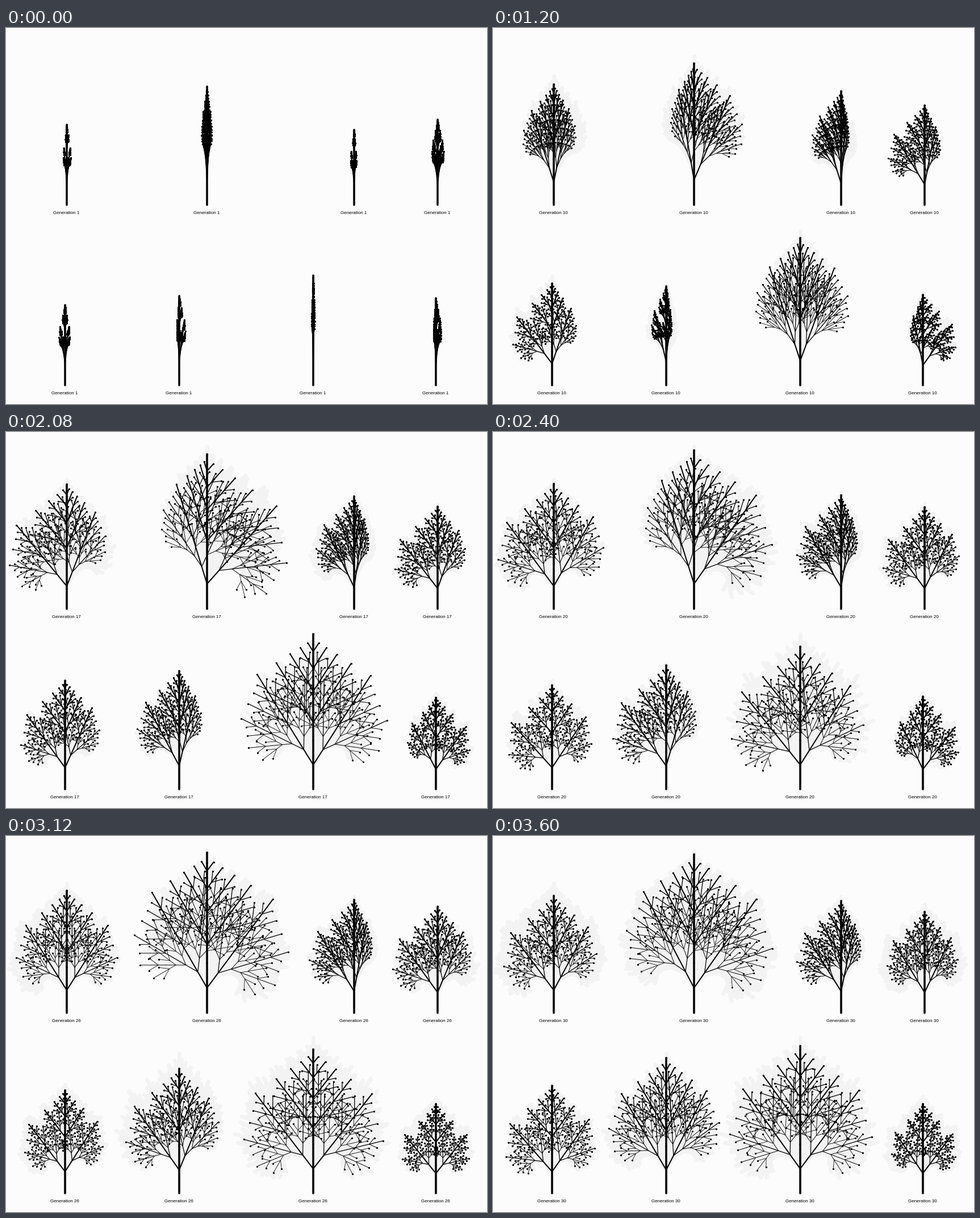
A matplotlib script that plays this animation: 847 by 661 pixels, repeating every 4.08 s.

```python
import numpy as np
import matplotlib.pyplot as plt
from matplotlib.animation import FuncAnimation
from matplotlib.collections import LineCollection
from matplotlib.colors import ListedColormap

W, H, DPI = 847, 661, 100
PX = 72 / DPI
STEP_MS, FRAMES = 80, 51
GEN_MS, LAST_GEN = 120, 30
LEVELS = 6
START_ANGLE = 5
PAPER, SHADOW, INK = "#fcfcfc", "#f3f3f3", "#000000"

RATIOS = np.linspace(0.1, 1.2, 1200)
SUMS = sum(RATIOS**k for k in range(LEVELS))


def ramp(start, end, span):
    """Smooth rise over the given number of generations."""
    t = np.clip(np.arange(LAST_GEN) / span, 0, 1)
    return start + (end - start) * t * t * (3 - 2 * t)


def plant(x, y, stem, height, left, right):
    """height is (start, end, span); left and right are (final angle, span)."""
    rng = np.random.default_rng(x)
    tall = ramp(*height) * rng.normal(1, 0.03, LAST_GEN)
    angles = [ramp(START_ANGLE, *side) + rng.normal(0, 2.5, LAST_GEN)
              for side in (left, right)]
    genes = np.column_stack([tall, *np.maximum(angles, 1)])
    return x, y, stem, genes


PLANTS = [
    plant(107, 311, 40, (139, 216, 6), left=(35, 20), right=(30, 20)),
    plant(354, 311, 44, (220, 280, 12), left=(32, 36), right=(36, 16)),
    plant(613, 311, 38, (129, 200, 10), left=(30, 16), right=(14, 40)),
    plant(760, 311, 36, (149, 180, 16), left=(35, 10), right=(27, 24)),
    plant(104, 628, 38, (139, 181, 7), left=(36, 8), right=(35, 26)),
    plant(305, 628, 41, (149, 232, 24), left=(33, 20), right=(33, 40)),
    plant(541, 628, 43, (207, 256, 6), left=(37, 20), right=(35, 20)),
    plant(757, 628, 35, (151, 164, 20), left=(36, 26), right=(35, 10)),
]


def grow(x, y, stem, height, left, right):
    """Each axis forks at its middle and carries a smaller copy at its tip."""
    ratio = np.interp(height / (2 * stem), SUMS, RATIOS)
    left, right = np.radians([left, right])
    pos = np.array([[x, y]], float)
    ang, order = np.zeros(1), np.zeros(1, int)
    length = stem
    segs, orders = [], []
    for _ in range(LEVELS):
        step = length * np.column_stack([np.sin(ang), -np.cos(ang)])
        fork, tip = pos + step, pos + 2 * step
        segs.append(np.stack([pos, tip], axis=1))
        orders.append(order)
        pos = np.concatenate([fork, fork, tip])
        ang = np.concatenate([ang - left, ang + right, ang])
        order = np.concatenate([order + 1, order + 1, order])
        length *= ratio
    return np.concatenate(segs), np.concatenate(orders), tip


def grove(gen):
    parts = [grow(x, y, stem, *genes[gen - 1]) for x, y, stem, genes in PLANTS]
    return [np.concatenate(p) for p in zip(*parts)]


def footprint(segs, radius=3):
    """Stage mask of all axes, thickened by a small disc."""
    t = np.linspace(0, 1, 80)[None, :, None]
    pts = segs[:, :1] * (1 - t) + segs[:, 1:] * t
    col, row = np.floor(pts.reshape(-1, 2)).astype(int).T
    ok = (col >= 4) & (col < W - 4) & (row >= 4) & (row < H - 4)
    thin = np.zeros((H, W), bool)
    thin[row[ok], col[ok]] = True
    mask = thin.copy()
    for dy in range(-radius, radius + 1):
        for dx in range(-radius, radius + 1):
            if dx * dx + dy * dy <= radius * radius + 1:
                mask |= np.roll(thin, (dy, dx), axis=(0, 1))
    return mask


GROVES = [grove(g) for g in range(1, LAST_GEN + 1)]
SHADOWS = [np.zeros((H, W), bool)]
for segs, _, _ in GROVES[:-1]:
    SHADOWS.append(SHADOWS[-1] | footprint(segs))

fig = plt.figure(figsize=(W / DPI, H / DPI), dpi=DPI, facecolor=PAPER)
ax = fig.add_axes([0, 0, 1, 1])
ax.axis("off")
shade = ax.imshow(SHADOWS[0], cmap=ListedColormap([PAPER, SHADOW]), vmin=0, vmax=1,
                  extent=(0, W, H, 0), aspect="auto", interpolation="nearest")
ax.set_xlim(0, W)
ax.set_ylim(H, 0)

twigs = ax.add_collection(LineCollection([], colors=INK, capstyle="round"))
buds = ax.scatter([], [], s=(3.2 * PX) ** 2, c=INK, linewidths=0, zorder=3)
labels = [ax.text(x - 0.5, y + 16, "", ha="center", va="baseline", color=INK,
                  fontsize=8 * PX, family="Liberation Sans")
          for x, y, _, _ in PLANTS]


def draw(frame):
    gen = min(max(frame * STEP_MS // GEN_MS, 1), LAST_GEN)
    segs, orders, dots = GROVES[gen - 1]
    shade.set_data(SHADOWS[gen - 1])
    twigs.set_segments(segs)
    twigs.set_linewidths((0.7 + 2.8 * 0.45**orders) * PX)
    buds.set_offsets(dots)
    for label in labels:
        label.set_text(f"Generation {gen}")
    return [shade, twigs, buds, *labels]


anim = FuncAnimation(fig, draw, frames=FRAMES, interval=STEP_MS, repeat=True)
plt.show()
```
